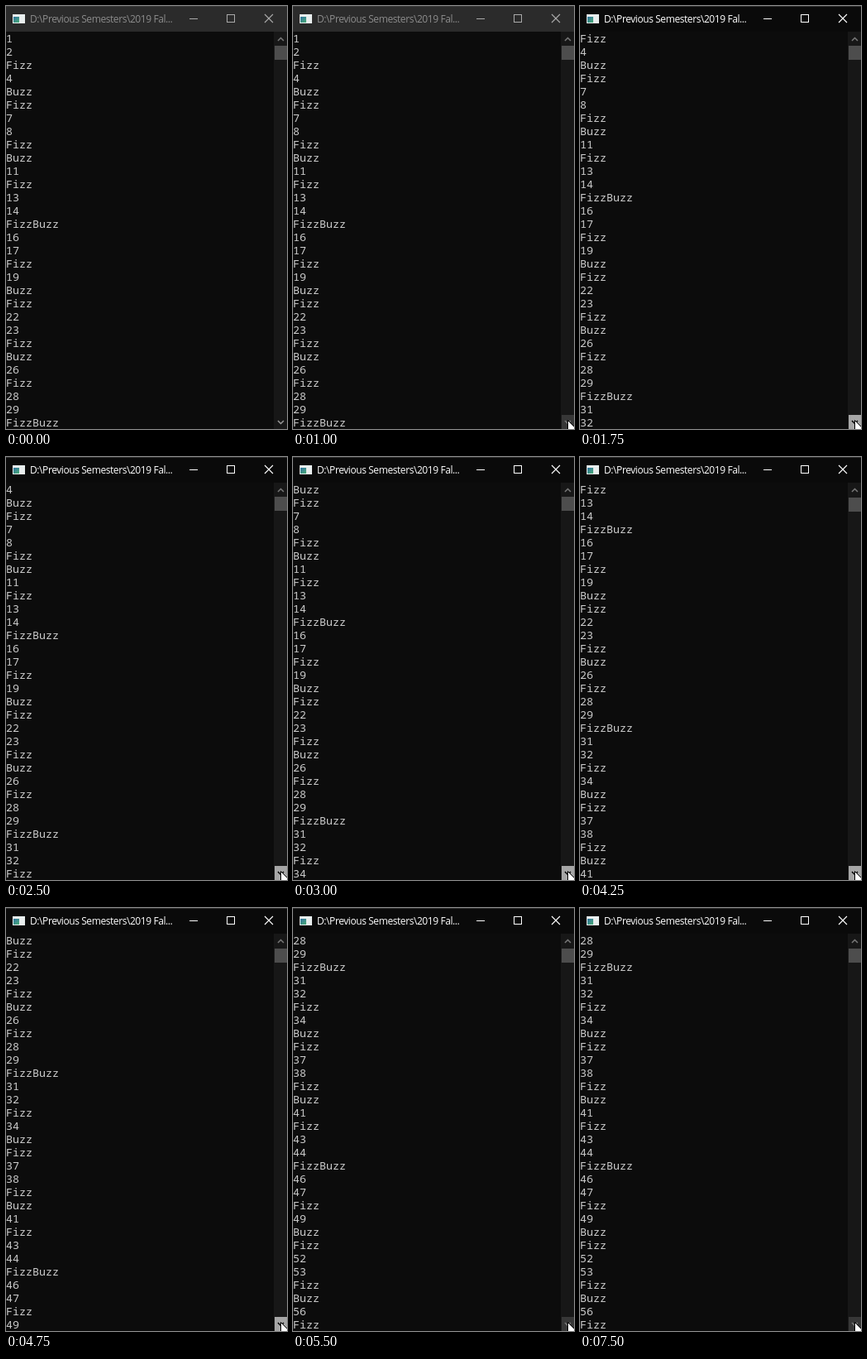
Recreate the animation shown at these times as an HTML page with a canvas. Size 340 px wide and 511 px high, loop 8000 ms.

```html
<!DOCTYPE html>
<html lang="en">
<head>
<meta charset="utf-8">
<title>FizzBuzz console</title>
<style>
html, body { margin: 0; height: 100%; overflow: hidden; background: #0c0c0c; }
canvas { display: block; }
</style>
</head>
<body>
<canvas id="stage" width="340" height="511"></canvas>
<script>
const ctx = document.getElementById('stage').getContext('2d');
const LOOP = 8000, TICK = 250, ROW = 16;
const MONO = '13.333px "Noto Sans Mono", "DejaVu Sans Mono", monospace';
const SANS = '12px "Open Sans", "Noto Sans", sans-serif';

// Mouse presses on the down button; the last one is held and auto-repeats
const presses = [
  { start: 1250, hold: 0 },
  { start: 1750, hold: TICK },
  { start: 2500, hold: TICK },
  { start: 3000, hold: TICK },
  { start: 3750, hold: 7 * TICK },
];
const first = presses[0], last = presses[presses.length - 1];

const fizz = n => (n % 3 ? '' : 'Fizz') + (n % 5 ? '' : 'Buzz') || String(n);

// One line per press, then four lines per tick while held
function topLine(t) {
  const clicked = 1 + presses.filter(p => t >= p.start).length;
  const held = Math.min(t - last.start, last.hold - TICK);
  return Math.max(clicked, 4 + 4 * Math.floor(held / TICK));
}

function buttonColors(t) {
  if (presses.some(p => t >= p.start && t < p.start + p.hold)) return ['#a6a6a6', '#000'];
  return t < 750 ? ['#171717', '#999'] : ['#373737', '#777'];
}

function rect(color, x, y, w, h) {
  ctx.fillStyle = color;
  ctx.fillRect(x, y, w, h);
}

function line(color, width, ...points) {
  ctx.strokeStyle = color;
  ctx.lineWidth = width;
  ctx.beginPath();
  points.forEach(p => ctx.lineTo(...p));
  ctx.stroke();
}

function text(str, x, y, color, font, spacing = '0px') {
  ctx.fillStyle = color;
  ctx.font = font;
  ctx.letterSpacing = spacing;
  ctx.fillText(str, x, y);
}

function chevron(color, y, dir) {
  line(color, 1.5, [329, y - 2 * dir], [332.5, y + 1.5 * dir], [336, y - 2 * dir]);
}

function titleBar(active) {
  const ink = active ? '#fff' : '#aaa';
  rect(active ? '#0a0a0a' : '#2b2b2b', 0, 0, 340, 31);
  rect(active ? '#303030' : '#3c3c3c', 0, 0, 340, 1);

  rect('#e8eeee', 8, 10, 15, 11);
  const picture = ctx.createLinearGradient(9, 12, 15, 20);
  picture.addColorStop(0, '#2f6fa5');
  picture.addColorStop(1, '#48a878');
  rect(picture, 9, 13, 7, 7);

  text('D:\\Previous Semesters\\2019 Fal...', 29, 20, active ? '#fff' : '#8c8c8c', SANS, '-0.42px');
  rect(ink, 222, 15, 10, 1);
  ctx.strokeStyle = ink;
  ctx.lineWidth = 1;
  ctx.strokeRect(267.5, 10.5, 9, 9);
  line(ink, 1.1, [313, 10], [323, 20]);
  line(ink, 1.1, [323, 10], [313, 20]);
}

function scrollBar(t, top) {
  const [back, ink] = buttonColors(t);
  rect('#171717', 324, 31, 16, 480);
  chevron('#777', 40, -1);
  rect('#4d4d4d', 325, top < 12 ? 48 : 49, 15, 17);
  rect(back, 325, 494, 15, 17);
  chevron(ink, 503, 1);
}

function pointer(x, y) {
  const shape = new Path2D('M.5 .5V16.5L4.2 13L6.8 19L9 18L6.5 12.2H12Z');
  ctx.save();
  ctx.translate(x, y);
  ctx.fillStyle = '#fff';
  ctx.strokeStyle = '#000';
  ctx.lineWidth = 1;
  ctx.fill(shape);
  ctx.stroke(shape);
  ctx.restore();
}

function draw(t) {
  const top = topLine(t);
  rect('#0c0c0c', 0, 0, 340, 511);
  titleBar(t >= first.start);
  for (let i = 0; i < 30; i++) text(fizz(top + i), 0, 44 + i * ROW, '#ccc', MONO);
  scrollBar(t, top);
  if (t >= 750) pointer(332, 500);
  else if (t >= 500) pointer(325, 505);
}

const start = performance.now();
function frame() {
  draw((performance.now() - start) % LOOP);
  requestAnimationFrame(frame);
}
frame();
</script>
</body>
</html>
```
